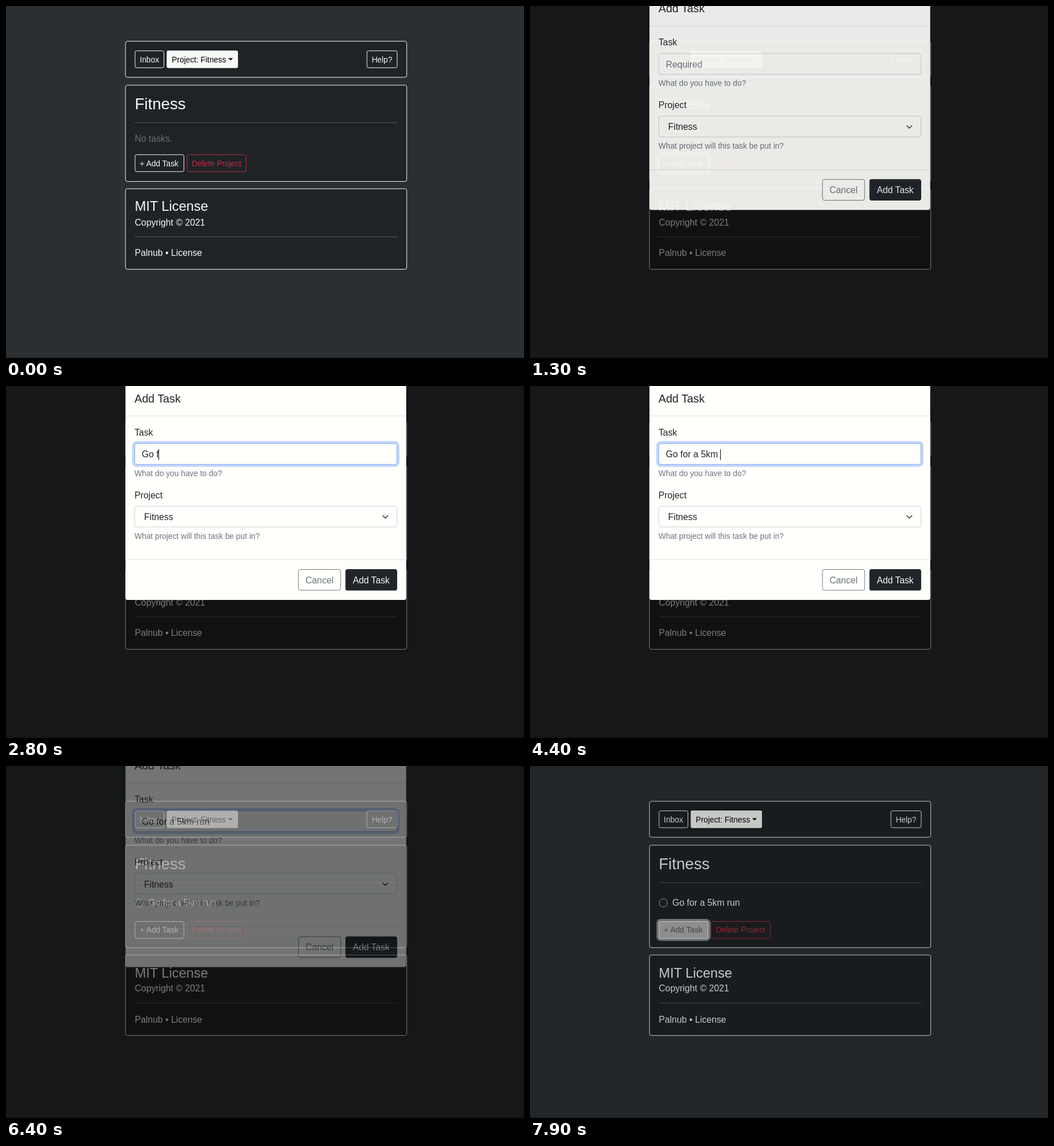
Animation, 907 px wide and 617 px high, one loop 8000 ms. Source, as an HTML page:

```html
<!DOCTYPE html>
<html lang="en">
<head>
<meta charset="utf-8">
<title>Task list</title>
<style>
  html, body { margin: 0; width: 100%; height: 100%; overflow: hidden; background: #2b2f32; }
  svg { display: block; width: 907px; height: 617px; font: 16px "Liberation Sans", Arial, sans-serif; }
  text { white-space: pre; }
  .page text { fill: #f8f9fa; }
  .card { fill: #1f2326; stroke: #f8f9fa; }
  .hr { stroke: #f8f9fa; stroke-opacity: .25; }
  .btn { fill: none; stroke: #f8f9fa; }
  .page text.muted { fill: #6a6e76; }
  .page .red { stroke: #bb2d42; }
  .page text.redText { fill: #bb2d42; }
  .sm { font-size: 14px; }
  .modal text { fill: #212529; }
  .modal text.grey { fill: #6c757d; }
  .line { stroke: #dee2e6; }
  .field { fill: #fffffc; stroke: #ced4da; }
</style>
</head>
<body>
<svg viewBox="0 0 907 617">
  <rect width="907" height="617" fill="#2b2f32"/>
  <path d="M0 616.5h907" stroke="#000" stroke-opacity=".3"/>

  <!-- Page units are CSS pixels, shown slightly reduced -->
  <g class="page" transform="translate(208.7 61.3) scale(.987)">
    <rect class="card" x=".5" y=".5" width="499" height="64" rx="3.5"/>
    <g class="sm">
      <rect class="btn" x="17.5" y="17.5" width="51.2" height="30" rx="2.7"/>
      <text x="26" y="38">Inbox</text>
      <rect x="73.6" y="17" width="126.5" height="31" rx="3" fill="#f6f9f5"/>
      <text x="82.6" y="38" style="fill:#000">Project: Fitness</text>
      <path d="M182.7 30.5h8.4l-4.2 4.2z"/>
      <rect class="btn" x="428.9" y="17.5" width="53.6" height="30" rx="2.7"/>
      <text x="437.4" y="38">Help?</text>
    </g>

    <rect id="taskCard" class="card" x=".5" y="78.5" width="499" height="171" rx="3.5"/>
    <text x="17" y="121.3" font-size="28">Fitness</text>
    <path class="hr" d="M17 145h466"/>
    <text id="empty" class="muted" x="17" y="179">No tasks.</text>
    <g id="item">
      <circle cx="25" cy="181" r="7.3" fill="none" stroke="#b8babc"/>
      <text x="41" y="186">Go for a 5km run</text>
    </g>

    <g data-dy="12">
      <rect id="addRing" x="15" y="199.5" width="91.7" height="35" rx="5" fill="none" stroke="#f8f9fa" stroke-width="4"/>
      <rect id="addFill" x="17" y="201.5" width="87.7" height="31" rx="3" fill="#f8f9fa"/>
      <rect class="btn" x="17.5" y="202" width="86.7" height="30" rx="2.7"/>
      <rect id="delFill" x="109.1" y="201.5" width="106" height="31" rx="3" fill="#dc3545"/>
      <rect class="btn red" x="109.6" y="202" width="105" height="30" rx="2.7"/>
    </g>
    <g class="sm" data-dy="11">
      <text id="addText" x="26" y="222.5">+ Add Task</text>
      <text class="redText" x="118.1" y="222.5">Delete Project</text>
    </g>

    <g data-dy="11">
      <rect class="card" x=".5" y="262.5" width="499" height="143" rx="3.5"/>
      <text x="17" y="327.5">Copyright © 2021</text>
      <path class="hr" d="M17 347.8h466"/>
    </g>
    <g data-dy="12">
      <text x="17" y="301.7" font-size="24">MIT License</text>
      <text x="17" y="382">Palnub</text>
      <text x="71.3" y="382">• License</text>
    </g>
  </g>

  <rect id="backdrop" width="907" height="617"/>

  <g transform="translate(208.7 61.3) scale(.987)">
    <g id="modal" class="modal">
      <rect x=".5" y="-120" width="498" height="437.8" rx="3.8" fill="#fffffc"/>
      <text x="16.5" y="-33" font-size="20">Add Task</text>
      <path class="line" d="M.5 -8.9h498M.5 246.4h498"/>

      <text x="16.5" y="25.7">Task</text>
      <rect id="focusRing" x="14.5" y="37.6" width="470" height="42" rx="6" fill="none" stroke="#c2d5fb" stroke-width="4"/>
      <rect class="field" x="17" y="40.1" width="465" height="37" rx="3.5"/>
      <rect id="focusEdge" x="17" y="40.1" width="465" height="37" rx="3.5" fill="none" stroke="#86b0f0"/>
      <text id="hint" class="grey" x="29.5" y="65">Required</text>
      <text id="typed" x="29.5" y="65"></text>
      <rect id="caret" y="50.4" width="1" height="19"/>
      <text class="grey sm" x="16.5" y="97.7">What do you have to do?</text>

      <text x="16.5" y="137">Project</text>
      <rect class="field" x="17" y="151.3" width="465" height="37" rx="3.5"/>
      <text x="33.5" y="176">Fitness</text>
      <path d="M457 168.2l4.5 4.5l4.5-4.5" fill="none" stroke="#343a40" stroke-width="1.6" stroke-linecap="round" stroke-linejoin="round"/>
      <text class="grey sm" x="16.5" y="209">What project will this task be put in?</text>

      <rect x="307.4" y="263.7" width="74.8" height="37" rx="3.5" fill="none" stroke="#6c757d"/>
      <text class="grey" x="319.9" y="288">Cancel</text>
      <rect id="submit" x="390.7" y="263.2" width="91.8" height="38" rx="4"/>
      <text x="403.7" y="288" style="fill:#f8f9fa">Add Task</text>
    </g>
  </g>
</svg>

<script>
const LOOP = 8000, STEP = 100;
const TASK = "Go for a 5km run";
// [time, characters typed so far]
const KEYS = [[2300, 1], [2600, 2], [2700, 3], [2800, 4], [3000, 5], [3100, 7], [3400, 8],
  [3500, 9], [3900, 10], [4300, 11], [4400, 13], [4800, 15], [4900, 16]];

const $ = id => document.getElementById(id);
const set = (id, name, value) => $(id).setAttribute(name, value);
const show = (id, on) => set(id, "visibility", on ? "visible" : "hidden");
const ramp = (t, start, length) => Math.min(1, Math.max(0, (t - start) / length));
const smooth = p => p * p * (3 - 2 * p);
const fade = (t, start, length = 150) => smooth(ramp(t, start, length));
const between = (t, a, b) => t >= a && t < b;

const shifted = document.querySelectorAll("[data-dy]");
const pen = document.createElement("canvas").getContext("2d");
pen.font = '16px "Liberation Sans", Arial, sans-serif';

function drawPage(t) {
  const added = t >= 6400;
  show("empty", !added);
  show("item", added);
  set("taskCard", "height", added ? 182 : 171);
  shifted.forEach(el => el.setAttribute("transform", `translate(0 ${added ? el.dataset.dy : 0})`));

  const hover = added
    ? fade(t, 7500, 100) - fade(t, 7841)
    : fade(t, 750) - fade(t, 965);
  set("addFill", "opacity", hover);
  const ink = Math.round(248 * (1 - hover));
  $("addText").style.fill = `rgb(${ink},${ink},${ink})`;
  set("addRing", "opacity", 0.5 * (added ? ramp(t, 7800, 100) : ramp(t, 900, 150)));
  set("delFill", "opacity", between(t, 7500, 7600) ? 0.5 : 0);

  const dim = ramp(t, 965, 150) - ramp(t, 6520, 200) + ramp(t, 7841, 150);
  set("backdrop", "opacity", 0.5 * dim);
}

function drawField(t) {
  const focus = fade(t, 1650, 200);
  set("focusRing", "opacity", focus);
  set("focusEdge", "opacity", focus);

  const count = KEYS.reduce((n, [at, chars]) => t >= at ? chars : n, 0);
  const text = TASK.slice(0, count);
  $("typed").textContent = text;
  show("hint", count === 0);
  set("caret", "x", Math.floor(29.5 + pen.measureText(text).width));
  set("caret", "opacity", between(t, 1700, 5200) && !between(t, 4100, 4300) ? 1 : 0);
}

function drawModal(t) {
  const opening = 1 - Math.pow(1 - ramp(t, 1163, 237), 1.2);
  const closing = 1 - Math.pow(1 - ramp(t, 6310, 300), 1.7);
  set("modal", "transform", `translate(0 ${-50 * (1 - opening + closing)})`);
  set("modal", "opacity", ramp(t, 1163, 150) - ramp(t, 6310, 150));
  set("submit", "fill", t >= 6300 ? "#1a1e21" : t >= 5900 ? "#1c1f23" : "#212529");
  drawField(t);
}

function draw(now) {
  const t = Math.floor((now % LOOP) / STEP) * STEP;
  drawPage(t);
  drawModal(t);
}

const began = performance.now();
function tick() {
  draw(performance.now() - began);
  requestAnimationFrame(tick);
}
tick();
</script>
</body>
</html>
```
